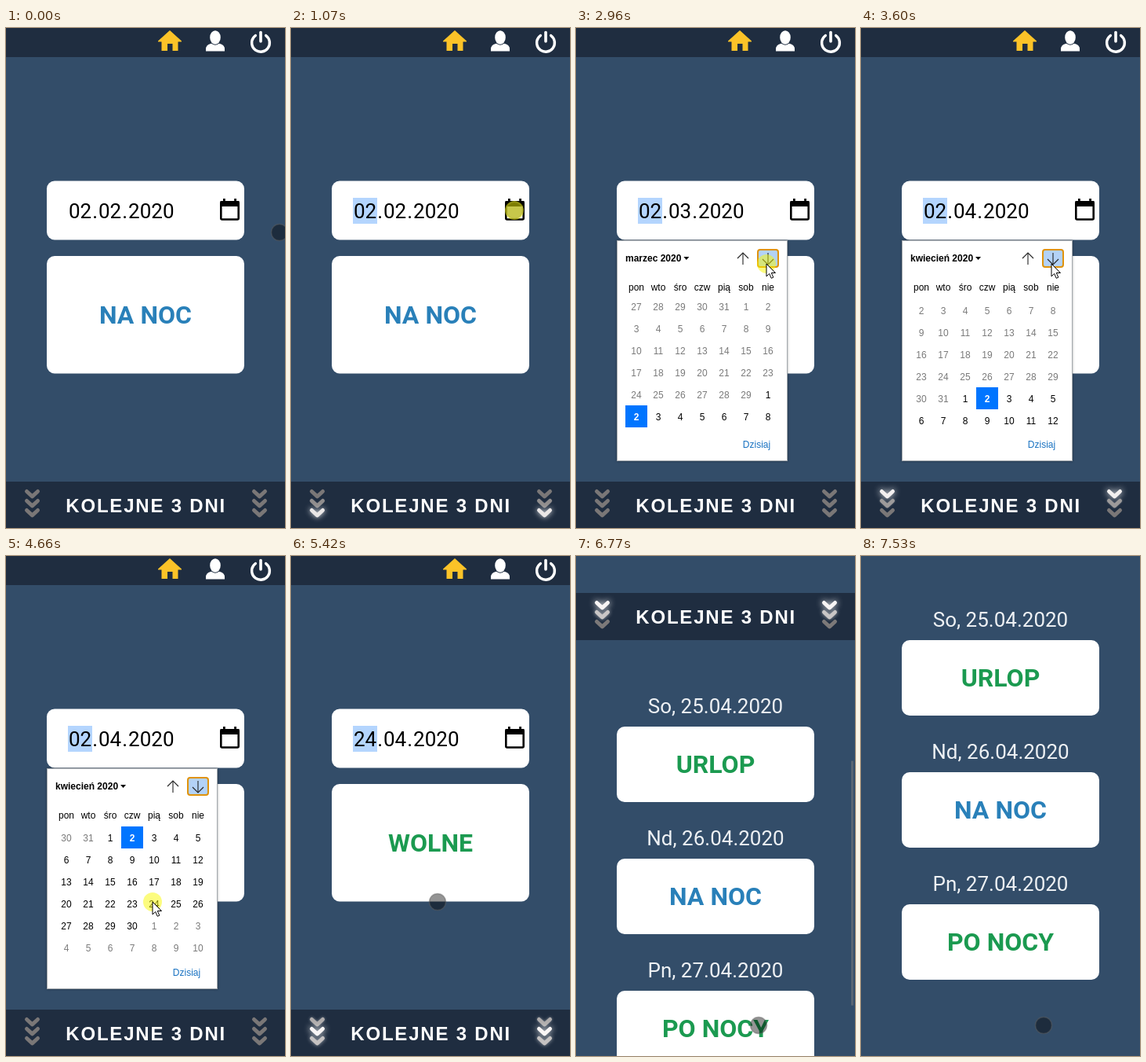
These frames come from a looping animation (356x636 px, 8000 ms). An HTML page with a canvas:

```html
<!DOCTYPE html>
<html lang="pl">
<head>
<meta charset="utf-8">
<title>Grafik</title>
<style>
  html, body { margin: 0; width: 100%; height: 100%; overflow: hidden; background: #334d69; }
  canvas { display: block; }
</style>
</head>
<body>
<canvas id="stage" width="356" height="636"></canvas>
<script>
const ctx = document.getElementById('stage').getContext('2d');
const W = 356, H = 636, LOOP = 8000;
const BG = '#334d69', BAR = '#1f2d40', BLUE = '#2980b9', GREEN = '#1b9a50';
const ROBOTO = 'Roboto, sans-serif';
const ARIAL = '"Liberation Sans", Arial, sans-serif';

const OPEN = 1130, CLOSE = 4780;
const CLICKS = [1020, 2860, 3440, 4660, 6390];
const TO_MARCH = 2900, TO_APRIL = 3492;
const SCROLL_START = 6407, SCROLL_TIME = 500, SCROLL_MAX = 640;

const clamp = v => Math.min(1, Math.max(0, v));
const lerp = (a, b, p) => a + (b - a) * p;
const inOut = p => p * p * (3 - 2 * p);
const easeIn = p => p * p;
const easeOut = p => 1 - (1 - p) * (1 - p);
const cubic = p => p < 0.5 ? 4 * p ** 3 : 1 - 4 * (1 - p) ** 3;
const swing = p => 0.5 - Math.cos(Math.PI * p) / 2;

function text(str, x, y, font, color, align = 'center') {
  ctx.font = font;
  ctx.fillStyle = color;
  ctx.textAlign = align;
  ctx.fillText(str, x, y);
}

function rect(x, y, w, h, color) {
  ctx.fillStyle = color;
  ctx.fillRect(x, y, w, h);
}

function card(y, h, label, color) {
  ctx.fillStyle = '#fff';
  ctx.beginPath();
  ctx.roundRect(52, y, 252, h, 10);
  ctx.fill();
  if (label) text(label, 178, y + h / 2 + 11.3, `bold 32px ${ROBOTO}`, color);
}

function line(points, color, width) {
  ctx.strokeStyle = color;
  ctx.lineWidth = width;
  ctx.beginPath();
  points.forEach(([x, y]) => ctx.lineTo(x, y));
  ctx.stroke();
}

function disc(x, y, r, color) {
  ctx.fillStyle = color;
  ctx.beginPath();
  ctx.arc(x, y, r, 0, 7);
  ctx.fill();
}

function header() {
  rect(0, 0, W, 37, BAR);

  ctx.fillStyle = '#fcc328';
  ctx.fill(new Path2D('M209 3L224 16.5V17.5H219.5V29H212.5V20H206V29H198.5V17.5H194V16.5Z'));

  ctx.fillStyle = '#fff';
  ctx.fill(new Path2D('M255 29.5V27Q255 21.5 261 20L267 19L273 20Q279 21.5 279 27V29.5Z'));
  ctx.beginPath();
  ctx.ellipse(267, 12, 6.8, 8.8, 0, 0, 7);
  ctx.strokeStyle = BAR;
  ctx.lineWidth = 2;
  ctx.stroke();
  ctx.fill();

  ctx.strokeStyle = '#fff';
  ctx.lineWidth = 3.4;
  ctx.lineCap = 'round';
  ctx.beginPath();
  ctx.arc(325, 18.8, 11.4, -0.95, Math.PI + 0.95);
  ctx.stroke();
  line([[325, 5.5], [325, 17]], '#fff', 3.6);
  ctx.lineCap = 'butt';
}

function dateField(t) {
  card(194.5, 75);
  if (t >= CLICKS[0]) rect(79, 216, 31, 33, '#b4d5fe');
  const day = t < CLOSE ? '02' : '24';
  const month = t < TO_MARCH ? '02' : t < TO_APRIL ? '03' : '04';
  const parts = [[day, 80], ['.', 110.2], [month, 118], ['.', 148.3], ['2020', 156.1]];
  for (const [str, x] of parts) text(str, x, 242, `26px ${ROBOTO}`, '#000', 'left');

  ctx.strokeStyle = '#000';
  ctx.lineWidth = 2.6;
  ctx.beginPath();
  ctx.roundRect(274.3, 221.3, 22.4, 22.2, 1.5);
  ctx.stroke();
  rect(273.5, 220, 24, 7, '#000');
  rect(277, 217, 2.8, 4, '#000');
  rect(291.2, 217, 2.8, 4, '#000');
}

function chevrons(cx, t) {
  const phase = (t - 180 + 1540) % 1540;
  ctx.lineCap = ctx.lineJoin = 'round';
  for (let i = 0; i < 3; i++) {
    const glow = Math.sin(Math.PI * clamp((phase - i * 200) / 800)) ** 2;
    const v = Math.round(lerp(122, 250, glow));
    const y = 589.5 + i * 12;
    ctx.shadowColor = `rgba(255,255,255,${glow})`;
    ctx.shadowBlur = 9 * glow;
    line([[cx - 7, y], [cx, y + 6.3], [cx + 7, y]], `rgb(${v},${v - 3},${v - 3})`, 5);
  }
  ctx.shadowBlur = 0;
  ctx.lineCap = 'butt';
  ctx.lineJoin = 'miter';
}

function nextDays(t) {
  rect(0, 577, W, 60, BAR);
  chevrons(33.5, t);
  chevrons(323.5, t);
  ctx.letterSpacing = '1.8px';
  text('KOLEJNE 3 DNI', 76.3, 616, `bold 24px ${ARIAL}`, '#fff', 'left');
  ctx.letterSpacing = '0px';

  const days = [
    ['So, 25.04.2020', 'URLOP', GREEN],
    ['Nd, 26.04.2020', 'NA NOC', BLUE],
    ['Pn, 27.04.2020', 'PO NOCY', GREEN]
  ];
  days.forEach(([date, label, color], i) => {
    const y = 747 + i * 168;
    text(date, 178, y - 17, `26px ${ROBOTO}`, '#eef1f4');
    card(y, 96, label, color);
  });
}

function monthArrow(x, dir) {
  const tip = 293.5 + dir * 7.5;
  line([[x, 293.5 - dir * 7.5], [x, tip]], '#222', 1.1);
  line([[x - 7, tip - dir * 7], [x, tip], [x + 7, tip - dir * 7]], '#222', 1.1);
}

function calendar(t) {
  ctx.shadowColor = 'rgba(0,0,0,.35)';
  ctx.shadowBlur = 3;
  rect(52, 270, 218, 281, '#fff');
  ctx.shadowBlur = 0;
  ctx.strokeStyle = '#a3a8ad';
  ctx.lineWidth = 1;
  ctx.strokeRect(52.5, 270.5, 217, 280);

  const month = t < TO_MARCH ? 1 : t < TO_APRIL ? 2 : 3;
  const title = ['luty', 'marzec', 'kwiecień'][month - 1] + ' 2020';
  text(title, 63, 297, `bold 12px ${ARIAL}`, '#000', 'left');
  const tx = 66 + ctx.measureText(title).width;
  ctx.fillStyle = '#000';
  ctx.fill(new Path2D(`M${tx} 291h7l-3.5 4z`));

  const focused = t >= CLICKS[1];
  if (focused) {
    ctx.beginPath();
    ctx.roundRect(232, 282, 26, 22, 3);
    ctx.fillStyle = '#b3d2f8';
    ctx.fill();
    ctx.strokeStyle = '#e0930c';
    ctx.lineWidth = 2;
    ctx.stroke();
  }
  monthArrow(213, -1);
  monthArrow(245, 1);

  const plain = `12px ${ARIAL}`;
  ['pon', 'wto', 'śro', 'czw', 'pią', 'sob', 'nie']
    .forEach((name, c) => text(name, 77 + c * 28, 334, plain, '#000'));

  const top = 4 * cubic(clamp((t - TO_MARCH) / 300)) + 5 * cubic(clamp((t - TO_APRIL) / 300));
  ctx.save();
  ctx.beginPath();
  ctx.rect(53, 344, 216, 168);
  ctx.clip();
  for (let row = Math.floor(top); row < top + 6; row++) {
    const y = Math.round(358 + (row - top) * 28);
    for (let c = 0; c < 7; c++) {
      const date = new Date(Date.UTC(2020, 0, 27 + row * 7 + c));
      const day = date.getUTCDate(), inMonth = date.getUTCMonth() === month;
      const x = 77 + c * 28, chosen = inMonth && day === 2;
      if (chosen) {
        rect(x - 14, y - 14, 28, 28, focused ? '#0075ff' : '#dc9a12');
        if (!focused) rect(x - 12, y - 12, 24, 24, '#0075ff');
      }
      text(day, x, y + 4.5, chosen ? `bold ${plain}` : plain,
        chosen ? '#fff' : inMonth ? '#000' : '#7a7a7a');
    }
  }
  ctx.restore();
  text('Dzisiaj', 230.5, 534, plain, '#1a73c2');
}

// time, x, y, easing used to arrive
const PATH = [
  [180, 349, 260, inOut],
  [950, 285, 232, inOut],
  [1720, 285, 232, inOut],
  [2110, 275, 304, easeIn],
  [2500, 243, 300, easeOut],
  [3640, 243, 300, inOut],
  [4440, 187, 440, easeOut],
  [5470, 187, 440, inOut],
  [6000, 233, 597, inOut]
];

function pointerAt(t) {
  const i = PATH.findIndex(k => k[0] > t);
  if (i === 0) return PATH[0].slice(1, 3);
  if (i < 0) return PATH.at(-1).slice(1, 3);
  const [t0, x0, y0] = PATH[i - 1], [t1, x1, y1, ease] = PATH[i];
  const p = ease((t - t0) / (t1 - t0));
  return [lerp(x0, x1, p), lerp(y0, y1, p)];
}

function pointer(t, popup) {
  const [x, y] = pointerAt(t);
  const overPopup = popup && x < 270 && y > 270;
  if (!overPopup) {
    disc(x, y, 10.5, 'rgba(0,0,0,.42)');
    ctx.strokeStyle = 'rgba(95,95,95,.45)';
    ctx.lineWidth = 1.5;
    ctx.stroke();
  }
  if (CLICKS.some(c => t >= c && t < c + 130)) disc(x, y, 12, 'rgba(250,250,0,.5)');
  if (overPopup) {
    const arrow = new Path2D(`M${x} ${y}v16l3.7-3.5 2.5 5.8 2.6-1.1-2.5-5.7h5.2z`);
    ctx.fillStyle = '#fff';
    ctx.fill(arrow);
    ctx.strokeStyle = '#000';
    ctx.lineWidth = 1;
    ctx.stroke(arrow);
  }
}

function scrollbar(t, scroll) {
  if (t < SCROLL_START || t >= 7530) return;
  const alpha = t < 7340 ? 0.5 : 0.2;
  rect(351, 3 + scroll * 0.486, 3, 311, `rgba(128,128,128,${alpha})`);
}

function draw(t) {
  const scroll = SCROLL_MAX * swing(clamp((t - SCROLL_START) / SCROLL_TIME));
  const popup = t >= OPEN && t < CLOSE;
  rect(0, 0, W, H, BG);
  ctx.save();
  ctx.translate(0, -Math.round(scroll));
  header();
  dateField(t);
  if (t < CLOSE) card(290, 149.5, 'NA NOC', BLUE);
  else card(290, 149.5, 'WOLNE', GREEN);
  nextDays(t);
  if (popup) calendar(t);
  ctx.restore();
  scrollbar(t, scroll);
  pointer(t, popup);
}

const start = performance.now();
function tick() {
  draw((performance.now() - start) % LOOP);
  requestAnimationFrame(tick);
}
tick();
</script>
</body>
</html>
```
